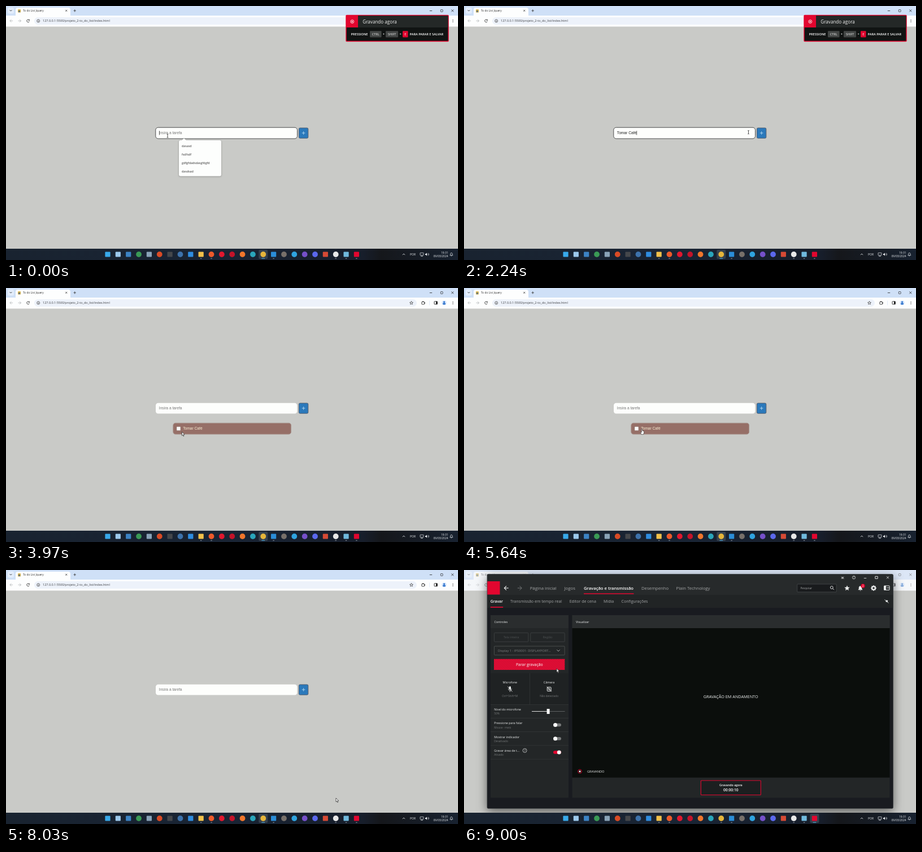
Recreate the animation shown at these times as an HTML page with a canvas. Size 800 by 450 pixels, loop 9030 ms.

```html
<!DOCTYPE html>
<html lang="pt">
<head>
<meta charset="utf-8">
<title>To do List Jquery</title>
<style>
html, body { margin: 0; width: 100%; height: 100%; overflow: hidden; background: #c9cac7; }
canvas { display: block; }
</style>
</head>
<body>
<canvas id="stage" width="800" height="450"></canvas>
<script>
const c = document.getElementById('stage').getContext('2d');
const LOOP = 9030;
const UI = '"Open Sans", "Noto Sans", sans-serif';
const ARIAL = '"Liberation Sans", Arial, sans-serif';
const RED = '#e2062f';
const TASK = 'Tomar Café';

const ADD_AT = 2800, DONE_AT = 6100, WINDOW_AT = 8380;

const clamp = v => Math.max(0, Math.min(1, v));
const swing = p => 0.5 - Math.cos(clamp(p) * Math.PI) / 2;

function box(x, y, w, h, fill, r = 0, line, lw = 0.7) {
  c.beginPath();
  c.roundRect(x, y, w, h, r);
  if (fill) { c.fillStyle = fill; c.fill(); }
  if (line) { c.strokeStyle = line; c.lineWidth = lw; c.stroke(); }
}
function disc(x, y, r, fill, line, lw = 0.8) {
  c.beginPath();
  c.arc(x, y, r, 0, 7);
  if (fill) { c.fillStyle = fill; c.fill(); }
  if (line) { c.strokeStyle = line; c.lineWidth = lw; c.stroke(); }
}
// Polyline from flat coordinates relative to (x, y)
function path(x, y, pts, line, lw = 0.8, fill) {
  c.beginPath();
  for (let i = 0; i < pts.length; i += 2) c.lineTo(x + pts[i], y + pts[i + 1]);
  if (fill) { c.closePath(); c.fillStyle = fill; c.fill(); }
  if (line) { c.strokeStyle = line; c.lineWidth = lw; c.stroke(); }
}
function text(s, x, y, size, fill, weight = 400, align = 'left', font = UI) {
  c.font = `${weight} ${size}px ${font}`;
  c.textAlign = align;
  c.textBaseline = 'alphabetic';
  c.fillStyle = fill;
  c.fillText(s, x, y);
}
function cross(x, y, r, color, lw) {
  path(x, y, [-r, -r, r, r], color, lw);
  path(x, y, [r, -r, -r, r], color, lw);
}
function star(x, y, r, line, fill) {
  const pts = [];
  for (let i = 0; i <= 10; i++) {
    const a = i * Math.PI / 5 - Math.PI / 2, d = i % 2 ? r * 0.45 : r;
    pts.push(d * Math.cos(a), d * Math.sin(a));
  }
  path(x, y, pts, line, 0.7, fill);
}
function arrowIcon(x, y, dir, color, r = 2.6, lw = 0.8) {
  path(x, y, [-r * dir, 0, r * dir, 0], color, lw);
  path(x, y, [0, -r, r * dir, 0, 0, r], color, lw);
}

function browser() {
  box(0, 0, 800, 450, '#c9cac7');
  box(0, 0, 800, 17, '#cfe0f7');
  box(0, 17, 800, 19.5, '#fdfefe');
  box(3, 2.5, 11, 11, '#e3edfb', 3);
  path(8.5, 8, [-1.8, -0.8, 0, 1, 1.8, -0.8], '#222', 0.9);
  box(17, 3, 97, 16, '#fdfefe', [4, 4, 0, 0]);
  box(21, 6, 5, 5.5, '#d9b64d', 0.8);
  box(22, 8, 3, 3, '#6c7b80');
  text('To do List Jquery', 30, 10.3, 4.8, '#333');
  cross(106.7, 8.3, 1.5, '#333', 0.8);
  path(121.7, 8.3, [-2.2, 0, 2.2, 0], '#333');
  path(121.7, 8.3, [0, -2.2, 0, 2.2], '#333');
  path(752, 8.5, [-2.2, 0, 2.2, 0], '#222');
  box(769.3, 6.5, 3.8, 3.8, null, 0.6, '#222');
  cross(790.3, 8.3, 2, '#222', 0.8);

  arrowIcon(9.5, 26.3, -1, '#b3b5b8');
  arrowIcon(24, 26.3, 1, '#b3b5b8');
  c.beginPath();
  c.arc(39.2, 26.3, 2.4, 0.4, 5.6);
  c.strokeStyle = '#333';
  c.lineWidth = 0.9;
  c.stroke();
  path(41.8, 23.4, [0, 0, 0, 2.4, -2.4, 2.4], null, 0, '#333');
  box(50, 20, 677, 13, '#edf2fa', 6.5);
  disc(57.2, 26.4, 2.5, null, '#444');
  box(56.8, 26, 0.8, 1.9, '#444');
  box(56.8, 24.7, 0.8, 0.8, '#444');
  text('127.0.0.1:5500/projeto_2-to_do_list/index.html', 65, 28.4, 5.5, '#3a3d42');

  star(717.5, 26.5, 3.1, '#333');
  box(735.8, 24.5, 4.8, 4.4, null, 0.6, '#333', 0.9);
  disc(738, 24.2, 1, '#333');
  disc(741, 26.6, 1, '#333');
  box(749, 22.5, 0.6, 8, '#cddcf3');
  box(758, 23.8, 5.4, 5, null, 0.5, '#222', 0.9);
  box(761, 23.8, 2.4, 5, '#222');
  disc(775.5, 26.3, 4, '#cfe2fb');
  disc(775.5, 25, 1.5, '#1c65c4');
  box(773, 27, 5, 2.2, '#1c65c4', 1.1);
  for (let i = -1; i < 2; i++) disc(791, 26.4 + i * 2, 0.6, '#333');
}

const APPS = ['#38a9ea', '#9cc9ec', '#3c83c4', '#3a9a55', '#8aa3b8', '#d94b25', '#45474b', '#3d72ab',
  '#2f8de0', '#f3c14a', '#ee5a2b', '#e0182f', '#c3142a', '#f0762c', '#2aa5ba', '#e6b53b', '#2b8dd8',
  '#77706a', '#2fa3df', '#7550c9', '#5b68ec', '#d64a35', '#e8e8e8', '#70b9dd', RED];
const SQUARE = [0, 1, 2, 4, 6, 8, 9, 16, 21, 23, 24];
const RUNNING = [9, 10, 15, 16, 22, 23, 24];

function taskbar(open) {
  const g = c.createLinearGradient(0, 0, 800, 0);
  g.addColorStop(0, '#192330');
  g.addColorStop(0.5, '#192434');
  g.addColorStop(0.79, '#171e2b');
  g.addColorStop(0.83, '#15171b');
  g.addColorStop(1, '#182230');
  box(0, 430, 800, 20, g);
  const active = open ? 24 : 15;
  box(180 + active * 18.35 - 8, 432, 16, 16, '#35404d', 2);
  APPS.forEach((col, i) => {
    const x = 180 + i * 18.35;
    if (SQUARE.includes(i)) box(x - 4.6, 435.4, 9.2, 9.2, col, 1);
    else disc(x, 440, 4.9, col);
    if (RUNNING.includes(i)) {
      const w = i === active ? 6 : 2.6;
      box(x - w / 2, 446.7, w, 1.1, i === active ? '#56b5e8' : '#9aa3ad', 0.5);
    }
  });
  const w = '#eef1f4';
  path(704, 440, [-2.2, 1.1, 0, -1.1, 2.2, 1.1], w);
  text('POR', 720, 442, 5, w, 400, 'center');
  box(733, 437.3, 6, 4.3, null, 0.4, w);
  path(736, 443.3, [-2, 0, 2, 0], w);
  path(742, 440, [0, -1, 1.3, -1, 3, -2.7, 3, 2.7, 1.3, 1, 0, 1], null, 0, w);
  for (const r of [1.8, 3.3]) {
    c.beginPath();
    c.arc(745.2, 440, r, -0.8, 0.8);
    c.strokeStyle = w;
    c.lineWidth = 0.6;
    c.stroke();
  }
  text('19:31', 782.5, 438.6, 4.9, w, 400, 'right');
  text('09/03/2024', 782.5, 445.3, 4.9, w, 400, 'right');
  bell(788.3, 440, 0.85, null, w);
}
function bell(x, y, k, fill, line) {
  const p = [-3, 2, -2, 0.6, -2, -1.5, -1, -3, 1, -3, 2, -1.5, 2, 0.6, 3, 2, -3, 2];
  path(x, y, p.map(v => v * k), line, 0.7, fill);
  box(x - 0.8, y + 2.8 * k, 1.6, 0.8, fill || line);
}

function recordToast() {
  box(602, 16.5, 181, 46, '#111413', 1, RED, 1.4);
  box(623, 17.2, 159.3, 20.8, '#242827');
  box(602, 16.5, 21, 21.5, RED);
  disc(612.8, 27.6, 2.9, null, '#fff', 0.9);
  disc(612.8, 27.6, 1.2, '#fff');
  text('Gravando agora', 631.3, 31, 8.1, '#f2f2f2');
  text('PRESSIONE', 610.5, 52, 5.6, '#fff', 600);
  box(644, 44.3, 20.5, 11.2, '#434645', 1);
  text('CTRL', 654.2, 52, 5.6, '#f2f2f2', 400, 'center');
  text('+', 668.3, 52, 5.6, '#fff', 600, 'center');
  box(672, 44.3, 22, 11.2, '#434645', 1);
  text('SHIFT', 683, 52, 5.6, '#f2f2f2', 400, 'center');
  text('+', 698, 52, 5.6, '#fff', 600, 'center');
  box(702, 44.3, 9.5, 11.2, RED, 1);
  text('E', 706.7, 52, 5.6, '#fff', 400, 'center');
  text('PARA PARAR E SALVAR', 714.6, 52, 5.6, '#fff', 600);
}

function suggestions() {
  c.save();
  c.shadowColor = 'rgba(0,0,0,.3)';
  c.shadowBlur = 3;
  c.shadowOffsetY = 0.7;
  box(306, 238, 75, 63.5, '#fdfefd', 3);
  c.restore();
  path(315, 238.2, [-4, 0, 0, -3.6, 4, 0], null, 0, '#fdfefd');
  ['dasasd', 'fsdfsdf', 'gdfgfdadsdasgfdgfd', 'dasdsad'].forEach((s, i) =>
    text(s, 311, 249.6 + i * 15, 5.35, '#2b2b2b', 500));
}

function typedAt(t) {
  const delays = [420, 540, 650, 760, 870, 960, 1070, 1200, 1320, 1520];
  return TASK.slice(0, delays.filter(d => t >= d).length);
}

function form(t) {
  const focused = t < 2650;
  const mid = t < ADD_AT ? 225 : t < DONE_AT ? 213 : 212;
  const typed = t < ADD_AT ? typedAt(t) : '';
  if (focused) box(264.8, mid - 9.8, 250.7, 19.8, '#fdfefc', 4.5, '#3b3d3d', 0.9);
  else box(265, mid - 9.3, 250.3, 18.8, '#fdfefc', 4.3);
  text(typed || 'Insira a tarefa', 270.8, mid + 2.2, 6.67, typed ? '#222' : '#777', 400, 'left', ARIAL);
  if (focused && (t < 500 || t % 1000 > 50 && t % 1000 < 550)) {
    const x = 271 + (typed ? c.measureText(typed).width : 0);
    box(x, mid - 3.8, 0.7, 7.4, '#111');
  }
  box(518.4, mid - 9, 16.4, 18.2, '#2b79bb', 2, '#4f5968', 0.9);
  path(526.6, mid, [-2.8, 0, 2.8, 0], '#b7dcf2', 0.9);
  path(526.6, mid, [0, -2.8, 0, 2.8], '#b7dcf2', 0.9);
  if (typed === '' && t < 420) suggestions();
}

function task(t) {
  const a = swing((t - ADD_AT) / 1200) * (1 - swing((t - DONE_AT) / 1000));
  if (a <= 0) return;
  c.save();
  c.globalAlpha = a;
  box(295.8, 239.2, 208.8, 19.9, '#966f67', 4.2, '#a99791', 1);
  box(302, 245.7, 6.9, 6.9, '#fcfcfa', 0.8, '#8a7d78', 0.4);
  text(TASK, 313.2, 251.2, 6.67, '#fbf1d6', 400, 'left', ARIAL);
  c.restore();
}

function toggle(y, on) {
  box(158, y - 2.8, 14, 5.6, on ? RED : '#77797a', 2.8);
  disc(on ? 168.3 : 161.6, y, 3.5, '#fafafa');
}

function recorder() {
  const grey = '#a4a6a7', dim = '#747778', lit = '#eceeee', rule = '#343738';
  box(0, 0, 800, 36, 'rgba(235,238,243,.45)');
  c.save();
  c.shadowColor = 'rgba(0,0,0,.55)';
  c.shadowBlur = 18;
  c.shadowOffsetY = 5;
  box(41, 7.5, 718.5, 415, '#191b20', 2);
  c.restore();
  box(41, 7.5, 718.5, 36.5, '#272a2b', [2, 2, 0, 0]);
  box(41, 44, 718.5, 23, '#212425');
  box(41, 20, 22.5, 23.5, RED);
  box(41, 7.5, 718.5, 415, null, 2, '#3b3f43', 0.7);

  disc(670, 13.8, 1.9, grey);
  path(670, 13.8, [-3, -2, 3, 2], grey, 0.6);
  path(670, 13.8, [-3, 2, 3, -2], grey, 0.6);
  disc(690, 13.3, 2.7, null, lit, 0.7);
  text('?', 690, 15, 4.6, lit, 400, 'center');
  path(710, 14.5, [-2.2, 0, 2.2, 0], lit);
  box(727.8, 11.3, 4.4, 4, null, 0, lit, 0.9);
  cross(750, 13.3, 2, lit, 0.8);

  arrowIcon(75, 32, -1, lit, 3.7, 1.1);
  arrowIcon(98.5, 32, 1, dim, 3.7, 1);
  text('Página inicial', 116.7, 35.1, 7.75, grey);
  text('Jogos', 177.5, 35.1, 7.75, grey);
  text('Gravação e transmissão', 212, 35.1, 7.65, '#fff', 600);
  box(212, 41.2, 88.5, 1.5, RED);
  text('Desempenho', 314, 35.1, 7.7, grey);
  text('Plain Technology', 375.5, 35.1, 7.7, grey);
  box(589.7, 25, 69.5, 14, '#191b1d', 1, '#4c5052');
  text('Pesquisar', 595.5, 33.8, 4.5, grey);
  disc(650.8, 31, 2.4, null, lit, 0.9);
  path(652.5, 32.7, [0, 0, 2.4, 2.4], lit, 1);
  star(678, 32.2, 5, null, lit);
  bell(701.5, 32.5, 1.35, lit);
  disc(706, 28.2, 3.6, RED);
  text('2', 706, 30, 4.8, '#fff', 400, 'center');
  for (let i = 0; i < 4; i++) {
    const a = i * Math.PI / 4, x = 4.8 * Math.cos(a), y = 4.8 * Math.sin(a);
    path(725, 32, [-x, -y, x, y], lit, 2);
  }
  disc(725, 32, 2.8, '#272a2b', lit, 2);
  box(743.5, 28, 9.5, 7.5, null, 0.5, lit, 1);
  box(743.5, 28, 3.4, 7.5, lit);
  path(748, 31.7, [0, 0, 5, 0], lit, 0.9);

  text('Gravar', 46.8, 58.2, 6.8, '#fff', 600);
  box(46.8, 65, 22.4, 1.7, RED);
  text('Transmissão em tempo real', 82, 58.2, 7.05, grey);
  text('Editor de cena', 186.7, 58.2, 7.05, grey);
  text('Mídia', 247, 58.2, 7.05, grey);
  text('Configurações', 278.5, 58.2, 7.05, grey);
  path(748, 55.5, [-3.5, -3, 3.5, 3], lit, 0.9);
  path(748, 55.5, [-2, 0.5, 0, -2.5, 2.5, -1, 1, 1.5], null, 0, lit);

  box(47, 80, 138, 323.5, '#232627');
  box(47, 80, 138, 23, '#2a2d2e');
  text('Controles', 53.5, 93.9, 5.3, lit);
  box(53.5, 111.3, 60.3, 15.8, null, 1, '#474a4b');
  box(117.8, 111.3, 60.3, 15.8, null, 1, '#474a4b');
  text('Tela inteira', 83.6, 121, 5.4, '#4e5253', 400, 'center');
  text('Região', 148, 121, 5.4, '#4e5253', 400, 'center');
  box(53.5, 135, 124.6, 15.7, null, 1, '#5a5d5e');
  text('Display 1 - IPS0001- DISPLAYPORT...', 60, 144.9, 5.7, '#7e8182');
  path(167, 142.6, [-2.7, -1.3, 0, 1.4, 2.7, -1.3], grey, 1);

  c.save();
  c.beginPath();
  c.rect(53, 157.5, 125.5, 19.5);
  c.clip();
  box(53, 157.5, 125.5, 19.5, '#ee0d37');
  for (let x = 30; x < 180; x += 3) path(x, 157, [0, 0, 21, 21], '#a80f2c', 0.8);
  c.restore();
  text('Parar gravação', 115.8, 169.9, 6.85, '#fff', 400, 'center');

  box(47, 183, 138, 55.3, '#1f2223');
  box(116, 183, 0.7, 55, rule);
  text('Microfone', 81.3, 201, 5.4, lit, 400, 'center');
  text('Câmera', 150.5, 201, 5.4, lit, 400, 'center');
  box(79.8, 206, 3.2, 6, lit, 1.6);
  path(81.4, 211, [-3, -1, -2, 2, 0, 2.7, 2, 2, 3, -1], lit, 0.7);
  path(81.4, 211, [0, 2.5, 0, 5], lit, 0.8);
  path(81.4, 211, [-4, -4.5, 4, 4.5], lit, 0.9);
  box(147.3, 207.6, 6.8, 7, null, 0.8, lit, 1);
  disc(150.7, 211, 1.5, null, lit);
  path(150.7, 211, [-4.2, -4.4, 4.2, 4.4], lit, 0.9);
  text('Ctrl+Shift+M', 81.2, 224.6, 4.85, dim, 400, 'center');
  text('Não detectado', 150.6, 224.6, 4.8, dim, 400, 'center');

  for (const y of [238, 262, 286.3, 310.5, 334.7]) box(47, y, 138, 0.7, rule);
  const rows = [['Nível do microfone', '50%'], ['Pressione para falar', 'Mouse - meio'],
    ['Mostrar indicador', 'Desativado'], ['Gravar área de t...', 'Ativado']];
  rows.forEach(([name, state], i) => {
    const y = 249 + i * 24.3;
    text(name, 53.3, y, 5.4, lit);
    text(state, 53.3, y + 7.3, 4.75, dim);
  });
  box(120, 250, 58.5, 0.9, '#5e6162');
  box(120, 250, 28, 0.9, lit);
  box(146.6, 246, 5, 9, '#fafafa', 0.6);
  toggle(274.5, false);
  toggle(298.7, false);
  toggle(323, true);
  disc(107.6, 319.8, 3.5, null, lit, 0.7);
  text('?', 107.6, 321.9, 5.5, lit, 400, 'center');

  box(191.5, 80, 562, 323.5, '#232627');
  box(191.5, 80, 562, 23, '#2a2d2e');
  text('Visualizar', 198, 93.9, 5.3, lit);
  box(191.5, 103, 562, 264.7, '#0b0e0c');
  text('GRAVAÇÃO EM ANDAMENTO', 472.2, 227.2, 7.25, lit, 400, 'center');
  disc(205, 356.8, 3.4, null, RED, 0.9);
  disc(205, 356.8, 1.6, '#fff');
  text('GRAVANDO', 218, 358.9, 5.65, lit);
  box(419.3, 373, 106, 25.5, '#1c1f20', 1, RED, 1.1);
  text('Gravando agora', 472.3, 382.9, 5.3, '#fff', 600, 'center');
  text('00:00:10', 472.3, 392.4, 6.7, '#fff', 600, 'center');
}

// Pointer hot spot: time, x, y
const ROUTE = [[0, 286, 230], [1800, 286, 230], [2350, 526, 223], [2700, 526, 223], [3080, 467.5, 356.3],
  [3400, 467.5, 356.3], [3900, 311.3, 254.8], [4700, 311.3, 254.8], [5200, 315, 250], [5700, 315, 250],
  [5950, 305.5, 249], [6250, 305.5, 249], [7000, 470, 350], [7700, 584, 404], [8080, 584, 404],
  [8260, 619, 438], [8420, 619, 438], [8900, 164, 174.6], [LOOP, 164, 174.6]];

function pointer(t, open) {
  const i = Math.max(1, ROUTE.findIndex(k => k[0] > t));
  const [t0, x0, y0] = ROUTE[i - 1], [t1, x1, y1] = ROUTE[i];
  const p = swing((t - t0) / (t1 - t0));
  const x = x0 + (x1 - x0) * p, y = y0 + (y1 - y0) * p;
  const within = (l, r, top, bottom) => !open && x > l && x < r && y > top && y < bottom;
  const hasTask = t > ADD_AT && t < DONE_AT + 1000;
  const top = t < ADD_AT ? 215 : 203;

  if (within(265, 515, top, top + 20)) {
    path(x, y, [-1.4, -3.2, 0, -2.8, 1.4, -3.2], '#222', 0.7);
    path(x, y, [-1.4, 3.2, 0, 2.8, 1.4, 3.2], '#222', 0.7);
    path(x, y, [0, -2.8, 0, 2.8], '#222', 0.8);
  } else if (within(518, 535, top, top + 20) || hasTask && within(301, 349, 244, 254)) {
    path(x, y, [-0.8, 0.2, 0, -0.4, 0.8, 0.2, 0.9, 3, 3.2, 3.6, 3.7, 4.6, 3.3, 7.4, 2.6, 9.4,
      -0.8, 9.4, -2.7, 6.2, -2.2, 5.2, -0.8, 6, -0.8, 0.2], '#222', 0.6, '#fff');
  } else {
    path(x, y, [0, 0, 0, 6.6, 1.5, 5.3, 2.6, 7.8, 3.7, 7.3, 2.6, 4.9, 4.7, 4.8, 0, 0], '#222', 0.7, '#fff');
  }
}

function draw(t) {
  const open = t >= WINDOW_AT;
  browser();
  form(t);
  task(t);
  c.globalAlpha = 1 - clamp((t - 3700) / 120);
  if (c.globalAlpha > 0 && t < 3820) recordToast();
  c.globalAlpha = 1;
  if (open) {
    c.globalAlpha = clamp((t - WINDOW_AT + 40) / 140);
    recorder();
    c.globalAlpha = 1;
  }
  taskbar(open);
  pointer(t, open);
}

const start = performance.now();
function tick() {
  draw((performance.now() - start) % LOOP);
  requestAnimationFrame(tick);
}
tick();
</script>
</body>
</html>
```
